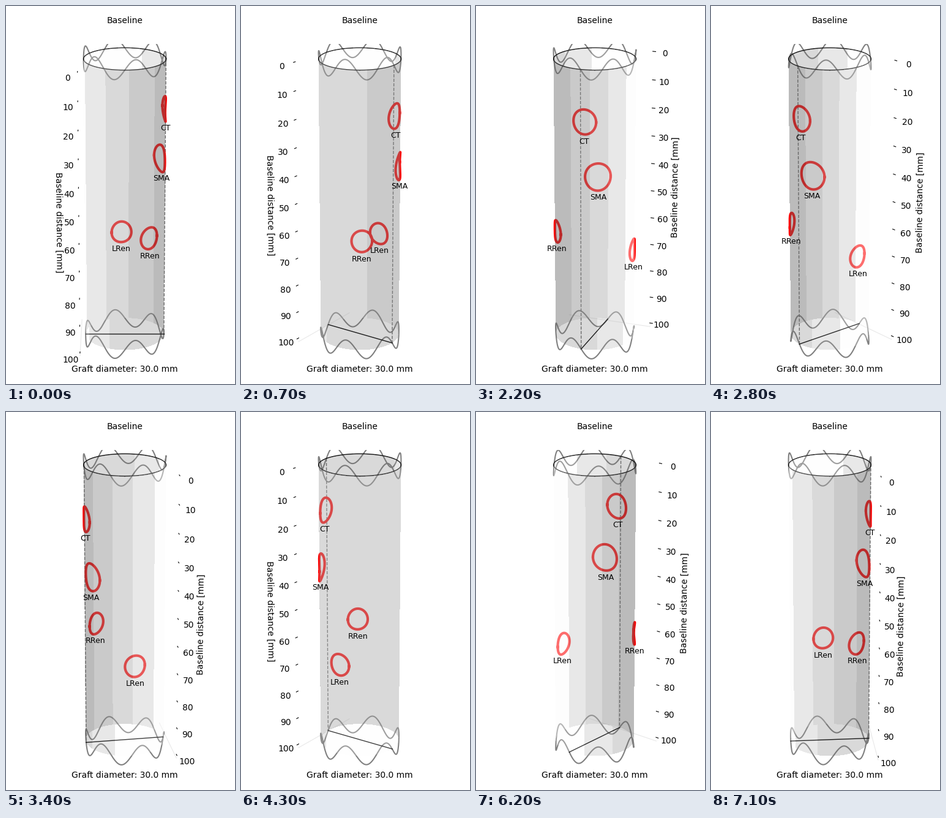
Animation of 374 by 617 pixels, one loop 7200 ms. Source, as a matplotlib script:

```python
import numpy as np
import matplotlib.pyplot as plt
from matplotlib.animation import FuncAnimation
from matplotlib.patches import Rectangle

W, H, DPI = 374, 617, 100
FRAMES, INTERVAL = 72, 100

# Camera and cylinder, in units of the cylinder radius
ELEV = np.radians(20)
DIST, FOCAL = 46, 3015
CX, CY = 194, 316.5
TOP = 3.64
BOX = 1.12
Z_STRETCH = 1.1

# Translucent wall: opacity, mean tone and light swing
ALPHA, TONE, SWING = 0.25, 166, 84

# name, angle in degrees, height, radius
VESSELS = [
    ("CT", 5.5, 2.34, 0.285),
    ("SMA", 24.5, 0.95, 0.317),
    ("RRen", -52, -0.72, 0.257),
    ("LRen", 95, -1.233, 0.257),
]
CORNERS = [(-1, -1), (-1, 1), (1, 1), (1, -1)]

plt.rcParams["font.family"] = "DejaVu Sans"
fig = plt.figure(figsize=(W / DPI, H / DPI), dpi=DPI, facecolor="white")
ax = fig.add_axes([0, 0, 1, 1])
ax.axis("off")


def project(lateral, depth, z):
    up = z * np.cos(ELEV) - depth * np.sin(ELEV)
    near = z * np.sin(ELEV) + depth * np.cos(ELEV)
    scale = FOCAL / (DIST - near)
    return CX + scale * lateral, CY - scale * up


def on_wall(theta, z):
    return project(np.sin(theta), np.cos(theta), z)


def in_box(p, q, z, spin):
    """Project a point given in the frame that turns with the cylinder."""
    lateral = p * np.sin(spin) + q * np.cos(spin)
    depth = p * np.cos(spin) - q * np.sin(spin)
    return project(lateral, depth, z)


# Pixel geometry of the two wall layers
px, py = np.meshgrid(np.arange(W) + 0.5, np.arange(H) + 0.5)
(right_top, y_top), (right_base, y_base) = (on_wall(np.pi / 2, z) for z in (TOP, -TOP))
half = right_top - CX + (right_base - right_top) * (py - y_top) / (y_base - y_top)
side = (px - CX) / half
inside = np.abs(side) <= 1
theta_front = np.arcsin(np.clip(side, -1, 1))
theta_back = np.pi - theta_front


def covered(theta):
    bulge = np.cos(theta)
    edges = []
    for z, mid in ((TOP, y_top), (-TOP, y_base)):
        reach = np.where(bulge > 0, on_wall(0, z)[1] - mid, mid - on_wall(np.pi, z)[1])
        edges.append(mid + reach * bulge)
    return inside & (py >= edges[0]) & (py <= edges[1])


front_mask, back_mask = covered(theta_front), covered(theta_back)
front_a, back_a = ALPHA * front_mask, ALPHA * back_mask
wall_alpha = 1 - (1 - front_a) * (1 - back_a)


def wall_image(spin):
    front = TONE - SWING * np.cos(theta_front - spin + np.pi / 4)
    back = TONE - SWING * np.cos(theta_back - spin + np.pi / 4)
    white = 255 * (1 - wall_alpha)
    tone = white + (1 - front_a) * back_a * back + front_a * front
    # The shade falls into even steps
    tone = 187 + 15.2 * np.round((tone - 187) / 15.2)
    tone = np.where(tone > 240, 254, tone)
    gray = (tone - white) / np.maximum(wall_alpha, ALPHA)
    rgba = np.empty((H, W, 4))
    rgba[..., :3] = np.clip(gray / 255, 0, 1)[..., None]
    rgba[..., 3] = wall_alpha
    return rgba


def line(color, width, z=1, **kw):
    return ax.plot([], [], color=color, lw=width, zorder=z, **kw)[0]


def label(text, size=10, **kw):
    return ax.text(0, 0, text, size=size, ha="center", va="center", zorder=6, **kw)


wall = ax.imshow(wall_image(0), extent=(0, W, H, 0), interpolation="nearest", zorder=4)
ax.set_xlim(0, W)
ax.set_ylim(H, 0)
ax.set_aspect("auto")

view = Rectangle((0, 62), W, 515, transform=ax.transData)
pane = line("#e8e8e8", 0.8)
stents = [line("gray", 1.5, 2) for _ in range(2)]
for stent in stents:
    stent.set_clip_path(view)
seam = line("#6c6c6c", 1, 2, ls="--")
base = line("black", 1, 2)
rim = line("black", 1, 2)
rings = [line("red", 3, 3) for _ in VESSELS]
names = [label(v[0], 9) for v in VESSELS]
ticks = [line("black", 0.8, 5) for _ in range(11)]
tick_labels = [label(str(10 * i)) for i in range(11)]
axis_label = label("Baseline distance [mm]", rotation_mode="anchor")

ax.text(CX, 28, "Baseline", size=10, ha="center", va="baseline")
ax.text(CX, 597, "Graft diameter: 30.0 mm", size=10, ha="center", va="baseline")

turn = np.linspace(0, 2 * np.pi, 361)
rim.set_data(*on_wall(turn, TOP))


def draw_axis(n, spin):
    p, q = CORNERS[n // 18]
    heights = np.linspace(TOP, -TOP, 11)
    for tick, text, z in zip(ticks, tick_labels, heights):
        tick.set_data(*in_box(p * BOX, q * np.array([1.11, 1.185]), z, spin))
        x, y = in_box(p * 1.345, q * 1.345, z, spin)
        text.set_position((x, y + 6.7))
    x0, y0 = in_box(p * BOX, q * BOX, TOP, spin)
    x1, y1 = in_box(p * BOX, q * BOX, -TOP, spin)
    tilt = np.degrees(np.arctan2(x1 - x0, y1 - y0))
    axis_label.set_rotation((-90 if x0 < CX else 90) + tilt)
    axis_label.set_position(in_box(p * 1.6, q * 1.6, 0, spin))
    pane.set_data(*in_box(p * BOX, q * np.array([BOX, -BOX]), -TOP - 0.1, spin))


def update(n):
    spin = np.radians(90 - 5 * n)
    wall.set_data(wall_image(spin))
    wave = -0.245 * np.sin(6 * turn)
    for stent, z in zip(stents, (TOP, -TOP)):
        stent.set_data(*on_wall(turn + spin, z + wave))
    seam.set_data(*on_wall(spin, np.array([TOP, -TOP])))
    base.set_data(*on_wall(spin + np.array([0, np.pi]), -TOP))
    for ring, name, (_, angle, z, r) in zip(rings, names, VESSELS):
        theta = spin + np.radians(angle)
        ring.set_data(*on_wall(theta + r * np.cos(turn), z + Z_STRETCH * r * np.sin(turn)))
        x, y = on_wall(theta, z - Z_STRETCH * r)
        name.set_position((x, y + 11.5))
    draw_axis(n, spin)
    return []


anim = FuncAnimation(fig, update, frames=FRAMES, interval=INTERVAL,
                     repeat=True, repeat_delay=0, blit=False)
plt.show()
```
